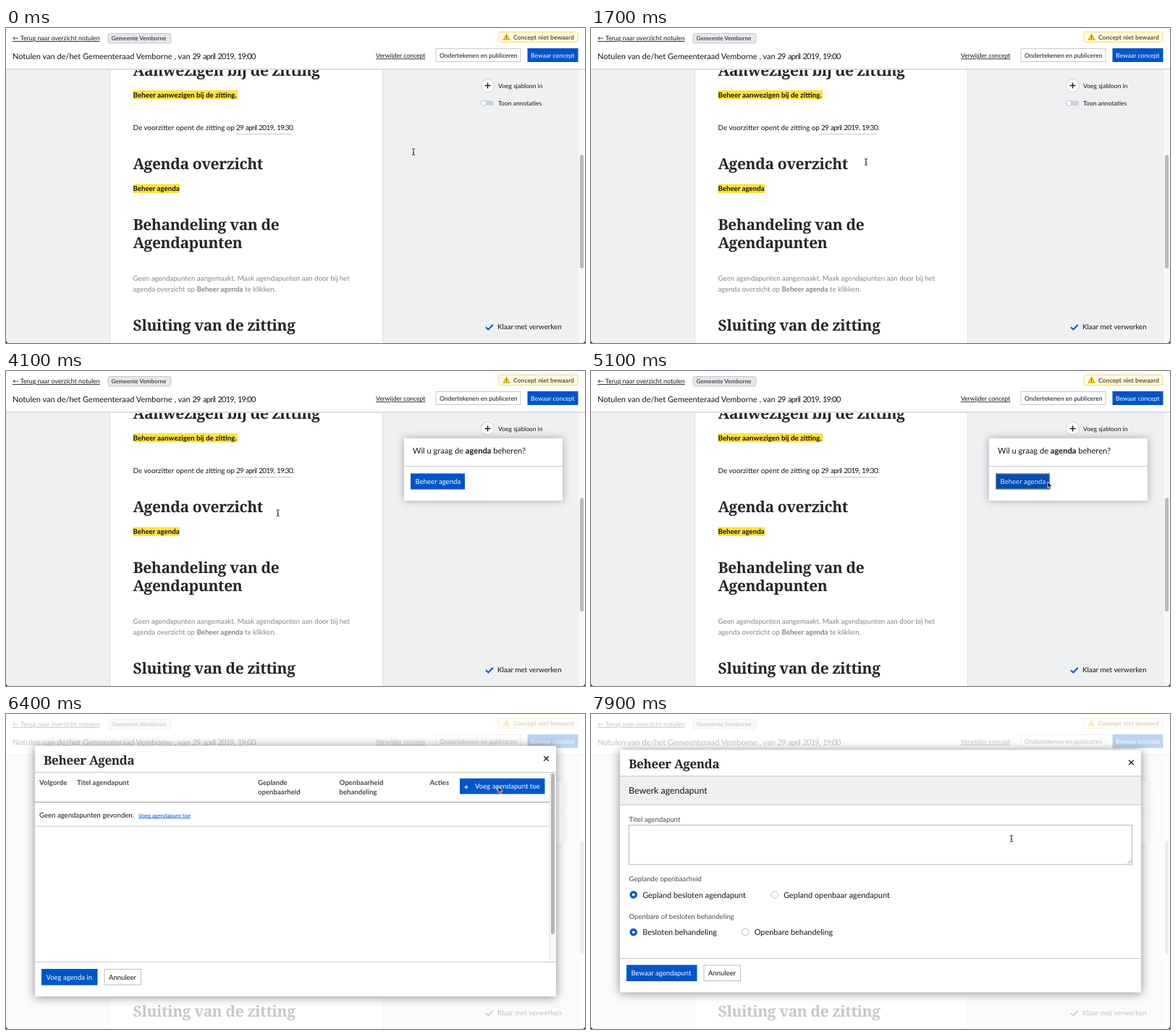
Write an HTML page that moves like this. It is 800 px wide and 435 px high and loops after 8 s.

```html
<!DOCTYPE html>
<html lang="nl">
<head>
<meta charset="utf-8">
<title>Notulen</title>
<style>
  html, body { margin: 0; width: 100%; height: 100%; overflow: hidden; background: #fff; }
  svg { display: block; width: 800px; height: 435px; }
  text { font-family: Lato, "Open Sans", "DejaVu Sans", sans-serif; fill: #141414; white-space: pre; text-rendering: geometricPrecision; }
  .b { font-weight: 700; }
  .u { text-decoration: underline; }
  .date { letter-spacing: -.066em; word-spacing: .1em; }
  .head { font-family: "Noto Serif", "DejaVu Serif", serif; font-weight: 700; fill: #262626; letter-spacing: -.018em; }
  .card { filter: drop-shadow(0 0 6px rgba(50, 55, 65, .4)); }
  .modal { filter: drop-shadow(0 1px 7px rgba(40, 44, 52, .55)); }
</style>
</head>
<body>
<svg id="stage" viewBox="0 0 800 435" xmlns="http://www.w3.org/2000/svg"></svg>
<script>
const BLUE = '#0055c8', GREY = '#eff0f2', MID = '#4a4a4a', LINE = '#c4c8cd';
const PLACE = 'Vemborne';

const text = (x, y, size, str, cls = '', fill = '') =>
  `<text x="${x}" y="${y}" font-size="${size}" class="${cls}"${fill && ` style="fill:${fill}"`}>${str}</text>`;
const rect = (x, y, w, h, fill, extra = '') =>
  `<rect x="${x}" y="${y}" width="${w}" height="${h}" fill="${fill}" ${extra}/>`;
const frame = (x, y, w, h, stroke, fill = '#fff', extra = '') =>
  rect(x + .5, y + .5, w - 1, h - 1, fill, `stroke="${stroke}" ${extra}`);
const path = (d, stroke, width = 1, fill = 'none') =>
  `<path d="${d}" stroke="${stroke}" stroke-width="${width}" fill="${fill}"/>`;
const group = (id, body, attrs = '') => `<g id="${id}" ${attrs}>${body}</g>`;
const bold = s => `<tspan class="b">${s}</tspan>`;
const date = s => `<tspan class="date">${s}</tspan>`;
const ring = (id, x, y, w, h) => group(id,
  rect(x, y, w, h, 'rgba(0,20,60,.12)') +
  frame(x, y, w, h, '#d8b13a', 'none', 'stroke-dasharray="2 1"'));

const button = (x, y, w, h, label, size = 9.5, primary = true) =>
  (primary ? rect(x, y, w, h, BLUE) : frame(x, y, w, h, '#b9bdc3')) +
  text(x + 6.5, y + h / 2 + 3.3, size, label, '', primary ? '#fff' : '');

const radio = (x, y, on, label) =>
  (on ? `<circle cx="${x}" cy="${y}" r="5.2" fill="${BLUE}"/><circle cx="${x}" cy="${y}" r="1.9" fill="#fff"/>`
      : `<circle cx="${x}" cy="${y}" r="4.7" fill="#fff" stroke="#b9bdc3"/>`) +
  text(x + 12.5, y + 4, 10.9, label);

const page = () => {
  const panel =
    rect(0, 0, 800, 435, GREY) +
    frame(143, 40, 378, 400, '#dcdfe3') +
    text(175.5, 65.8, 21, 'Aanwezigen bij de zitting', 'head') +
    rect(175.5, 86, 144.5, 12.5, '#ffe144') +
    text(175.5, 95.7, 9.85, 'Beheer aanwezigen bij de zitting.', 'b') +
    text(175.5, 141, 9.85, 'De voorzitter opent de zitting op') +
    text(318, 141, 9.85, date('29 april 2019, 19:30.')) +
    rect(318, 146, 77, 1, '#c8c8c8') +
    text(175.5, 194.9, 21, 'Agenda overzicht', 'head') +
    rect(175.5, 215.5, 64.5, 12.5, '#ffe144', 'id="mark"') +
    text(175.5, 225.2, 9.7, 'Beheer agenda', 'b') +
    text(175.5, 279.4, 21, 'Behandeling van de', 'head') +
    text(175.5, 303.7, 21, 'Agendapunten', 'head') +
    text(175.5, 349, 9.7, 'Geen agendapunten aangemaakt. Maak agendapunten aan door bij het', '', '#858585') +
    text(175.5, 363.6, 9.7, `agenda overzicht op ${bold('Beheer agenda')} te klikken.`, '', '#858585') +
    text(175.5, 417.8, 21, 'Sluiting van de zitting', 'head');

  const side =
    '<circle cx="665.5" cy="79.5" r="9" fill="#fff" stroke="#ccd0d5"/>' +
    path('M661.5 79.5h8M665.5 75.5v8', '#222', 1.5) +
    text(680, 82.7, 8.55, 'Voeg sjabloon in') +
    rect(657, 100.5, 17, 6.5, '#cbd0da', 'rx="3.2"') +
    '<circle cx="660.2" cy="103.7" r="3.7" fill="#fff" stroke="#b5bfd0"/>' +
    text(680, 107, 8.6, 'Toon annotaties') +
    path('M663 413.2l3.4 3.2 6.4-6.6', BLUE, 2.1) +
    text(679, 416.2, 9.8, 'Klaar met verwerken') +
    rect(791.5, 57, 8.5, 378, '#f9f9fa') +
    rect(793, 175, 5.2, 157, '#b9babb', 'rx="2.6"');

  const header =
    rect(0, 57, 800, 1, '#e3e5e8') + rect(0, 0, 800, 57, '#fff') + rect(0, 56, 800, 1, '#d3d6da') +
    text(9, 17, 8.8, '← Terug naar overzicht notulen', 'u') +
    frame(140.5, 7, 88, 14.5, '#c6cacf', '#e5e7ea', 'rx="2.5"') +
    text(145.5, 17.4, 8.05, 'Gemeente ' + PLACE, 'b', '#4c4f54') +
    text(9, 43.4, 11, `Notulen van de/het Gemeenteraad ${PLACE} , van ${date('29 april 2019, 19:00')}`) +
    frame(680.5, 5, 110, 15, '#f3dc6a', '#fffbe8', 'rx="2.5"') +
    path('M691.5 8.6l4.3 7.6h-8.6z', '#dba800', 1.2, '#ffe144') +
    path('M691.5 11v2.6M691.5 14.4v1', '#5d4c00', 1) +
    text(701, 15.8, 8.6, 'Concept niet bewaard', 'b', '#655514') +
    text(511, 41.3, 8.6, 'Verwijder concept', 'u') +
    frame(593.5, 28, 118, 19, '#c4c8cd') +
    text(599, 40.8, 8.6, 'Ondertekenen en publiceren') +
    rect(720.5, 28, 70, 19, BLUE) +
    text(725, 40.8, 8.65, 'Bewaar concept', '', '#fff');

  return panel + side + header;
};

const hint = () =>
  rect(520, 202, 68, 46, '#fff') + rect(585, 202, 3.5, 46, '#bcc4cf') +
  ['Klik om de', 'juiste optie', 'selecteren'].map((s, i) => text(528.5, 214.4 + i * 13.8, 8.9, s, '', MID)).join('');

const card = () =>
  rect(550, 93, 219, 86, '#fff', 'class="card"') +
  rect(550, 131, 219, 1, LINE) +
  text(562, 113.8, 11.1, `Wil u graag de ${bold('agenda')} beheren?`) +
  button(559, 141.5, 75, 22, 'Beheer agenda', 9.6) +
  ring('cardRing', 559, 141.5, 75, 22);

const shell = (y, h) =>
  rect(40, y, 720, h, '#fff', 'class="modal"') +
  text(52, y + 25.7, 17, 'Beheer Agenda', 'head') +
  path(`M743.2 ${y + 14.2}l6.6 6.6m0-6.6l-6.6 6.6`, '#222', 1.4) +
  rect(40, y + 36, 720, 1, LINE);

const listModal = () => {
  const heads = [
    [46, 'Volgorde'], [98, 'Titel agendapunt'], [348, 'Geplande', 'openbaarheid'],
    [460.5, 'Openbaarheid', 'behandeling'], [585.5, 'Acties']
  ];
  return shell(44, 346) +
    heads.map(([x, ...rows]) => rows.map((s, i) => text(x, 98.3 + i * 12.3, 9.6, s, 'b', MID)).join('')).join('') +
    rect(40, 122, 711, 33, '#e8e8e8', 'id="row"') +
    rect(40, 121, 711, 1.5, '#b0b3b7') + rect(40, 154.5, 711, 1, LINE) +
    rect(627, 89, 117.5, 21.5, BLUE) +
    path('M633.2 101h5.6M636 98.2v5.6', '#fff', 1) +
    text(648, 103.2, 9.6, 'Voeg agendapunt toe', '', '#fff') +
    ring('addRing', 627, 89, 117.5, 21.5) +
    text(46, 142.6, 9.6, 'Geen agendapunten gevonden.') +
    text(183, 142.6, 7.7, 'Voeg agendapunt toe', 'u', BLUE) +
    rect(751, 81, 9, 261, '#f8f8f8') + rect(750.5, 81, 1, 261, '#e3e3e3') +
    rect(753, 82, 5.2, 222, '#b4b5b6', 'rx="2.6"') +
    rect(40, 342, 720, 1, LINE) +
    button(49, 352, 77.5, 22.5, 'Voeg agenda in') +
    button(135.5, 352, 51.5, 22.5, 'Annuleer', 9.5, false);
};

const editModal = () =>
  shell(49.5, 335) +
  rect(40, 86, 720, 39.5, GREY) + rect(40, 85.5, 720, 1, LINE) + rect(40, 125, 720, 1, LINE) +
  text(52, 110, 12.4, 'Bewerk agendapunt') +
  text(52.5, 148.7, 9.6, 'Titel agendapunt', '', MID) +
  frame(52, 153, 696, 55.5, '#b3b7bc') +
  path('M741.5 206.5l5-5M744.3 206.5l2.2-2.2', '#777', .8) +
  text(52.5, 231, 9.6, 'Geplande openbaarheid', '', MID) +
  radio(58.7, 249.5, true, 'Gepland besloten agendapunt') +
  radio(253.7, 249.5, false, 'Gepland openbaar agendapunt') +
  text(52.5, 283, 9.6, 'Openbare of besloten behandeling', '', MID) +
  radio(58.7, 301.3, true, 'Besloten behandeling') +
  radio(213.2, 301.3, false, 'Openbare behandeling') +
  rect(40, 337, 720, 1, LINE) +
  button(49, 346.5, 97.5, 22.5, 'Bewaar agendapunt') +
  button(155.5, 346.5, 51.5, 22.5, 'Annuleer', 9.5, false);

const beam = 'M-2-4.4q2 0 2 1.4v6q0 1.4-2 1.4M2-4.4q-2 0-2 1.4M0 3q0 1.4 2 1.4M-1 .9h2';
const cursors =
  group('beam', path(beam, '#fff', 2.4) + path(beam, '#222', 1)) +
  group('hand', path('M-1 0q1.2-1 2 .2v3.3l3.4.8q1.4.4 1.2 1.9l-.8 4.3H-.2L-3 6.4q-.6-1.2.6-1.4L-1 5.8z', '#222', .9, '#fff')) +
  group('arrow', path('M0 0v8.6l2-1.9 1.4 3.2 1.5-.7-1.4-3h2.7z', '#fff', .8, '#111'));

document.getElementById('stage').innerHTML =
  page() + group('hint', hint()) + group('card', card()) +
  rect(0, 0, 800, 435, 'rgba(255,255,255,.74)', 'id="veil"') +
  group('list', listModal()) + group('edit', editModal()) +
  group('cursor', cursors) +
  '<path d="M0 431v4h4q-4 0-4-4M800 431v4h-4q4 0 4-4" fill="#111"/>';

const el = id => document.getElementById(id);
const LOOP = 8000, STEP = 100;

// Pointer stops: time, x, y
const stops = [
  [0, 563, 171], [700, 563, 171], [1700, 380, 185], [1900, 380, 185], [2500, 237, 219.5],
  [3700, 237, 219.5], [4700, 631, 153], [5500, 631, 153], [6000, 662, 118.5],
  [6500, 682, 98], [7300, 682, 98], [7900, 581, 172], [8000, 581, 172]
];
const shapes = [[0, 'beam'], [2400, 'hand'], [3800, 'beam'], [4400, 'arrow'], [7700, 'beam']];

// Visible spans: id, start, end
const spans = [
  ['hint', 2400, 3600], ['card', 3600, LOOP], ['cardRing', 5000, LOOP],
  ['veil', 5300, LOOP], ['list', 5300, 7400], ['row', 5300, 6100],
  ['addRing', 7000, 7400], ['edit', 7400, LOOP]
];

function pointer(t) {
  const i = stops.findIndex(s => s[0] > t);
  const [t0, x0, y0] = stops[i - 1], [t1, x1, y1] = stops[i];
  const p = (t - t0) / (t1 - t0), e = p * p * (3 - 2 * p);
  return [x0 + (x1 - x0) * e, y0 + (y1 - y0) * e];
}

const show = (id, on) => el(id).setAttribute('display', on ? 'inline' : 'none');

function draw(t) {
  for (const [id, from, to] of spans) show(id, t >= from && t < to);
  const shape = shapes.filter(s => s[0] <= t).pop()[1];
  for (const id of ['beam', 'hand', 'arrow']) show(id, id === shape);
  el('cursor').setAttribute('transform', `translate(${pointer(t)})`);
  el('mark').setAttribute('fill', t >= 2400 && t < 3600 ? '#eff0f2' : '#ffe144');
}

const start = performance.now();
function tick() {
  const t = (performance.now() - start) % LOOP;
  draw(Math.floor(t / STEP) * STEP);
  requestAnimationFrame(tick);
}
tick();
</script>
</body>
</html>
```
